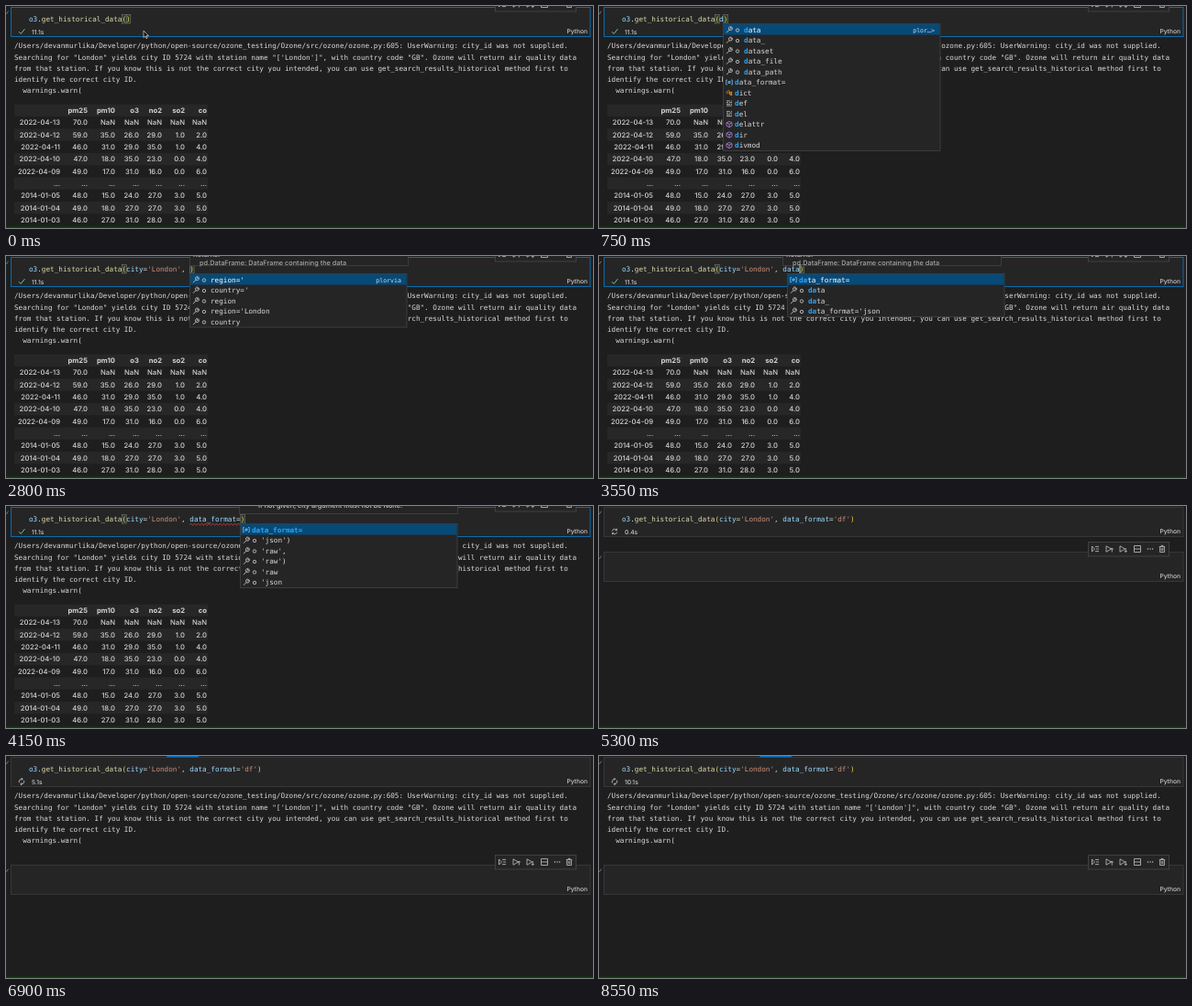
An HTML page that plays this animation: 640x243 px, repeating every 8600 ms.

```html
<!DOCTYPE html>
<html lang="en">
<head>
<meta charset="utf-8">
<title>Notebook cell</title>
<style>
  html, body { margin: 0; width: 100%; height: 100%; overflow: hidden; background: #1e1e1e; }
  svg { display: block; width: 640px; height: 243px; }
  text { white-space: pre; text-rendering: geometricPrecision; }
  .mono { font: 7.67px "DejaVu Sans Mono", monospace; }
  .hint { font: 6.6px "DejaVu Sans Mono", monospace; }
  .ui { font: 500 6.7px Inter, sans-serif; }
  .doc { font: 500 7.3px Inter, sans-serif; }
  .table { font: 500 7.7px Inter, sans-serif; }
  .head { font: 700 7.7px Inter, sans-serif; }
</style>
</head>
<body>
<svg id="stage" viewBox="0 0 640 243"></svg>
<script>
const LOOP = 8600, STEP = 50, RUN = 5100, WARN = 5600, BLINK = 167;
const CODE_X = 25, CHAR = 4.617, CALL = 'o3.get_historical_data(';
const stage = document.getElementById('stage');

// Arguments over time; "|" is the caret.
const typing = [
  [0, '|'], [600, 'd|'], [950, '|'],
  [1200, 'c|'], [1250, 'ci|'], [1300, 'cit|'], [1350, 'city|'], [1450, 'city=|'],
  [1500, "city='|'"], [1600, "city='L|'"], [1650, "city='Lo|'"], [1700, "city='Lon|'"],
  [1750, "city='Lond|'"], [1850, "city='Londo|'"], [1900, "city='London|'"],
  [2050, "city='London'|"], [2250, "city='London',|"], [2400, "city='London', |"],
  [3100, "city='London', d|"], [3200, "city='London', da|"], [3300, "city='London', dat|"],
  [3400, "city='London', data|"], [3700, "city='London', data_format=|"],
  [4300, "city='London', data_format='|'"], [4400, "city='London', data_format='d|'"],
  [4500, "city='London', data_format='df|'"], [4600, "city='London', data_format='df'|"],
];

// Row icons: w wrench, v variable, c class, k keyword, m method.
const rows = (icon, names) => names.split(' ').map(name => [icon, name]);
const popups = [
  { from: 650, to: 950, col: 24, match: 'd', hint: 'plor…>', rows: [
    ...rows('w', 'data data_ dataset data_file data_path'), ['v', 'data_format='],
    ['c', 'dict'], ...rows('k', 'def del'), ...rows('m', 'delattr dir divmod')] },
  { from: 1650, to: 2000, col: 30, match: 'Lo', hint: 'plorvia',
    rows: rows('w', "London' London London') London', Lon") },
  { from: 2450, to: 3100, col: 38, match: '-', hint: 'plorvia',
    rows: rows('w', "region=' country=' region region='London country") },
  { from: 3150, to: 3700, col: 39, match: 'da', hint: '',
    rows: [['v', 'data_format='], ...rows('w', "data data_ data_format='json")] },
  { from: 3750, to: 4300, col: 50, match: 'data_format=', hint: '',
    rows: [['v', 'data_format='], ...rows('w', "'json') 'raw', 'raw') 'raw 'json")] },
];

const warning = [
  '/Users/devanmurlika/Developer/python/open-source/ozone_testing/Ozone/src/ozone/ozone.py:605: UserWarning: city_id was not supplied.',
  'Searching for "London" yields city ID 5724 with station name "[\'London\']", with country code "GB". Ozone will return air quality data',
  'from that station. If you know this is not the correct city you intended, you can use get_search_results_historical method first to',
  'identify the correct city ID.',
  '  warnings.warn(',
];

const table = `- pm25 pm10 o3 no2 so2 co
2022-04-13 70.0 NaN NaN NaN NaN NaN
2022-04-12 59.0 35.0 26.0 29.0 1.0 2.0
2022-04-11 46.0 31.0 29.0 35.0 1.0 4.0
2022-04-10 47.0 18.0 35.0 23.0 0.0 4.0
2022-04-09 49.0 17.0 31.0 16.0 0.0 6.0
... ... ... ... ... ... ...
2014-01-05 48.0 15.0 24.0 27.0 3.0 5.0
2014-01-04 49.0 18.0 27.0 27.0 3.0 5.0
2014-01-03 46.0 27.0 31.0 28.0 3.0 5.0`.split('\n').map(line => line.split(' '));
const columnEnds = [59, 89, 119, 145, 170, 195, 219];

const rect = (x, y, w, h, fill, stroke = 'none', extra = '') =>
  `<rect x="${x}" y="${y}" width="${w}" height="${h}" fill="${fill}" stroke="${stroke}" ${extra}/>`;
const path = (d, stroke, fill = 'none', width = 0.8) =>
  `<path d="${d}" stroke="${stroke}" fill="${fill}" stroke-width="${width}"/>`;
const text = (x, y, content, cls = 'mono', fill = '#dadada', extra = '') =>
  `<text x="${x}" y="${y}" class="${cls}" fill="${fill}" ${extra}>${content}</text>`;
const span = (content, fill, extra = '') => `<tspan fill="${fill}" ${extra}>${content}</tspan>`;
const group = (x, y, content) => `<g transform="translate(${x} ${y})">${content}</g>`;
const END = 'text-anchor="end"';
const colX = col => CODE_X + col * CHAR;

function codeLine(args) {
  const colored = (args.match(/'[^']*'?|\w+|[^\w']+/g) || []).map(part =>
    span(part, part[0] === "'" ? '#ce9178' : /\w/.test(part) ? '#9cdcfe' : '#d4d4d4')).join('');
  return text(CODE_X, 16.8, span('o3', '#9cdcfe') + '.' + span('get_historical_data', '#dcdcaa') +
    span('(', '#e8cf4a') + colored + span(')', '#e8cf4a'));
}

// Red wave under a keyword that still lacks its value.
function errorWave(args) {
  const keyword = args.match(/\w+=$/);
  if (!keyword) return '';
  const waves = Math.round(keyword[0].length * CHAR / 4);
  return path(`M${colX(CALL.length + keyword.index)} 20.2` + 'q1-1.6 2 0t2 0'.repeat(waves), '#e0483e');
}

function caretAndBrackets(state) {
  const caret = state.indexOf('|'), length = state.length - 1, open = CALL.length;
  const box = col => rect(colX(col), 9.5, CHAR, 9.5, '#2b3a2b', '#888', 'stroke-width=".5"');
  return {
    boxes: caret === length ? box(open - 1) + box(open + length) : '',
    caret: rect(colX(open + caret) - 0.3, 9, 0.8, 10, '#c8c8c8'),
  };
}

const icons = {
  w: path('M-3 3.2L.6 -.4M3.2-2.4L1.8-1.2 1.1-1.9 2.4-3.2A2 2 0 1 0 3.2-2.4', '#c5c5c5', 'none', 0.9),
  v: path('M-2-2.5H-3.3V2.5H-2M2-2.5H3.3V2.5H2M-1.4 0A1.4 1.1 0 1 0 1.4 0A1.4 1.1 0 1 0-1.4 0M-1.2 1L1.2-1', '#75beff'),
  c: path('M-3-.5L-.8-2.7 .6-1.3-1.6 .9ZM0-.2H2M.5-.2V2H2M2-1.1L3.2-.2 2.2 .8ZM2 1.2L3.2 2.1 2.2 3Z', '#ee9d28'),
  k: path('M-3-2.6H.8M2-2.6H3M-3-.9H-1M0-.9H3M-3 .9H1M2 .9H3M-3 2.6H3', '#c5c5c5'),
  m: path('M0-3.2L3-1.7V1.6L0 3.2-3 1.6V-1.7ZM-3-1.7L0-.2 3-1.7M0-.2V3.2', '#b180d7'),
};

function suggestions(popup) {
  const x = Math.floor(colX(popup.col)), pitch = 11.5, n = popup.rows.length;
  let out = rect(x + 0.5, 19.5, 236.5, n * pitch + 1, '#252526', '#3c3c3c') +
    rect(x + 1, 20, 235.5, pitch, '#064a78');
  popup.rows.forEach(([icon, name], i) => {
    const y = 26 + i * pitch, prefixed = icon === 'w';
    const hit = name.startsWith(popup.match) ? popup.match : '';
    const label = span(hit, '#2aa4f8', 'font-weight="bold"') + name.slice(hit.length);
    out += group(x + 7, y, icons[icon]) + text(x + (prefixed ? 23 : 13), y + 2.7, label, 'mono', i ? '#dadada' : '#fff');
    if (prefixed) out += `<circle cx="${x + 16}" cy="${y + 0.5}" r="1.7" fill="none" stroke="#d4d4d4" stroke-width=".8"/>`;
  });
  return out + text(x + 231, 28.5, popup.hint, 'hint', '#c8dcec', END);
}

function signature(t) {
  if (t < 2350 || t >= 4600) return '';
  const late = t >= 3700, x = late ? 254 : 200;
  return rect(x + 0.5, -5, 238, late ? 13.5 : 15.5, '#252526', '#3c3c3c') +
    (late ? text(x + 21, 1.6, 'If not given, city argument must not be None.', 'doc', '#c4c4c4')
          : text(x + 4, 0.6, 'Returns:', 'doc', '#c4c4c4') +
            text(x + 11, 10, 'pd.DataFrame: DataFrame containing the data', 'doc', '#a8a8a8'));
}

function toolbar(y) {
  const play = 'M-3-3.2V3.2L2.6 0Z';
  const icon = (x, d) => group(x, y, path(d, '#c5c5c5'));
  return rect(533.5, y - 7.5, 88, 15.5, '#252526', '#414144') +
    icon(541, 'M-3.5-3V3L-.5 0ZM0-2.6H4M1 0H4M0 2.6H4') +
    icon(556, play + 'M3.3 3.5V-1M1.8 .5L3.3-1 4.8 .5') +
    icon(571, play + 'M3.3-1V3.5M1.8 2L3.3 3.5 4.8 2') +
    icon(587, 'M-3.5-3.5H3.5V3.5H-3.5ZM-3.5 0H3.5') +
    [-2.6, 0, 2.6].map(d => `<circle cx="${601 + d}" cy="${y}" r=".7" fill="#c5c5c5"/>`).join('') +
    icon(614, 'M-3.2-2.4H3.2M-1-2.4V-3.6H1V-2.4M-2.4-2.4V3.5H2.4V-2.4M-.8-1V2.2M.8-1V2.2');
}

const cell = (y, border) => rect(5.5, y - 0.5, 631.5, 32, '#252526', border) +
  text(634, y + 28, 'Python', 'ui', '#cccccc', END);
const chevron = y => path(`M-1 ${y}L.6 ${y + 1.6} 2.6 ${y - 1.4}`, '#8a8a8a');

const warningText = () => warning.map((line, i) => text(9, 46.4 + i * 12.15, line)).join('');

function dataTable() {
  return table.map((cells, r) => {
    const y = 114.2 + r * 13.32;
    const stripe = r % 2 ? '' : rect(9, y - 6.6, 211, 13.3, '#272728');
    return stripe + cells.map((value, c) => value === '-' ? '' :
      text(columnEnds[c], y + 2.8, value, r ? 'table' : 'head', '#d4d4d4', END)).join('');
  }).join('');
}

function progress(t) {
  const p = ((t - 6900) / 1650 + 0.29 + 2) % 1;
  const width = 16 * (1 + 2 * (1 - Math.abs(2 * p - 1)));
  return rect(p * 640 + 7 - width / 2, 0, width, 1.3, '#0e70c0');
}

function editing(t) {
  const state = typing.filter(([from]) => from <= t).pop()[1];
  const args = state.replace('|', '');
  const { boxes, caret } = caretAndBrackets(state);
  const popup = popups.find(p => p.from <= t && t < p.to);
  const caretOn = Math.floor(t / BLINK) % 2;
  return cell(2, '#0d6cab') + chevron(7) + boxes + codeLine(args) + errorWave(args) +
    path('M14 28.2L16.2 30.4 20.4 25.2', '#73c991', 'none', 1) + text(28, 30.6, '11.1s', 'ui', '#cccccc') +
    toolbar(-2) + warningText() + dataTable() + signature(t) +
    (popup ? suggestions(popup) : '') + (caretOn ? caret : '') +
    (t < STEP ? path('M150 27V34.6L151.8 33 153 35.6 154.2 35 153 32.6H155.4Z', '#ddd', '#111', 0.7) : '');
}

function running(t) {
  const seconds = Math.max(0, 0.4 + (t - 5300) * 0.00299);
  const clock = (Math.floor(seconds * 10) / 10).toFixed(1) + 's';
  const spinner = path('M-2.7-.6A2.8 2.8 0 0 1 2.2-1.7M2.7 .6A2.8 2.8 0 0 1-2.2 1.7M2.5-3.3V-1.4H.6M-2.5 3.3V1.4H-.6', '#c5c5c5');
  const top = t < WARN ? 51 : 120;
  return cell(2, '#37373a') + chevron(7) + codeLine("city='London', data_format='df'") +
    `<g transform="translate(17 28) rotate(${(t - 5300) * 0.54 % 360})">${spinner}</g>` +
    text(28, 30.6, clock, 'ui', '#cccccc') +
    (t < WARN ? '' : warningText()) +
    cell(top, '#37373a') + chevron(top + 5) + toolbar(top - 4) +
    (t < 5400 ? '' : progress(t));
}

let shown = -1;
function render(now) {
  const t = Math.floor(now % LOOP / STEP) * STEP;
  if (t !== shown) {
    shown = t;
    stage.innerHTML = rect(0, 0, 640, 243, '#1e1e1e') + (t < RUN ? editing(t) : running(t)) +
      rect(0, 241.5, 640, 1.5, '#064406');
  }
}

const start = performance.now();
function tick() {
  render(performance.now() - start);
  requestAnimationFrame(tick);
}
tick();
</script>
</body>
</html>
```
